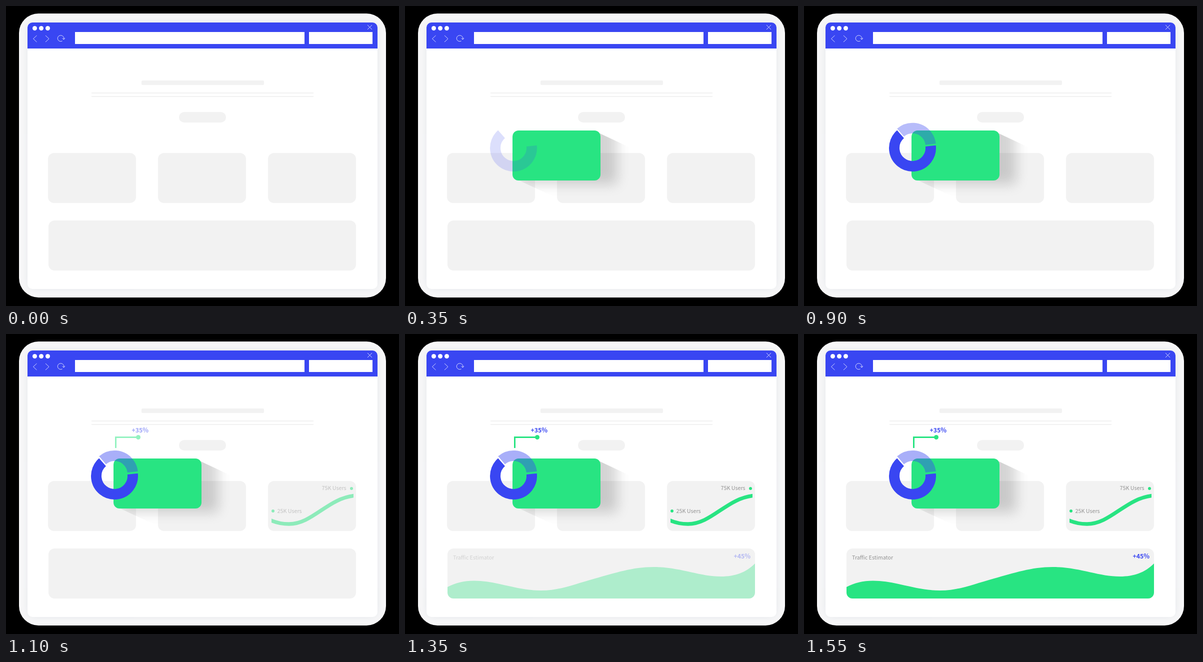
Write an HTML page that moves like this. It is 786 by 600 pixels and loops after 3.55 s.

```html
<!DOCTYPE html>
<html lang="en">
<head>
<meta charset="utf-8">
<title>Traffic dashboard</title>
<style>
  html, body { margin: 0; height: 100%; overflow: hidden; background: #000; }
  svg { display: block; }
  text { font: 10.75px "Noto Sans CJK SC", "Noto Sans CJK JP", "Noto Sans CJK", "Open Sans", sans-serif; fill: #929292; }
  .gain { font-size: 12.3px; font-weight: 700; fill: #3946f2; }
  .blocks { fill: #f2f2f2; }
  .icons { fill: none; stroke: #fff; stroke-width: .8; }
  .green { fill: #28e482; }
  .line { fill: none; stroke: #28e482; }
  .ring { fill: none; stroke: #3946f2; stroke-width: 21; }
  .layer { opacity: 0; }
</style>
</head>
<body>
<svg width="786" height="600" viewBox="0 0 786 600">
  <defs>
    <filter id="halo" x="-10%" y="-10%" width="120%" height="120%"><feGaussianBlur stdDeviation="9"/></filter>
    <filter id="soft" x="-40%" y="-50%" width="180%" height="200%"><feGaussianBlur stdDeviation="13"/></filter>
    <clipPath id="frame"><rect x="26" y="15" width="734" height="568" rx="39"/></clipPath>
    <clipPath id="window"><rect x="43" y="33" width="700" height="533" rx="10"/></clipPath>
    <clipPath id="sweep"><path d="M388 254L490 302V420H380L222 346Z"/></clipPath>
    <clipPath id="chart"><rect x="531" y="300" width="164" height="90"/></clipPath>
    <clipPath id="panel"><rect x="85" y="429" width="615" height="100" rx="12"/></clipPath>
  </defs>

  <g clip-path="url(#frame)">
    <rect width="786" height="600" fill="#f8f8f9"/>
    <rect x="43" y="33" width="700" height="533" rx="10" fill="#1c3050" opacity=".08" filter="url(#halo)"/>
  </g>
  <g clip-path="url(#window)">
    <rect x="43" y="33" width="700" height="533" fill="#fff"/>
    <rect x="43" y="33" width="700" height="52" fill="#3946f2"/>
  </g>
  <g fill="#fff">
    <circle cx="57.5" cy="44.5" r="4.5"/>
    <circle cx="70.5" cy="44.5" r="4.5"/>
    <circle cx="83.5" cy="44.5" r="4.5"/>
    <rect x="138" y="52" width="459" height="24"/>
    <rect x="606" y="52" width="127" height="24"/>
  </g>
  <path class="icons" d="M723 38l9 9m0-9l-9 9M61.5 59l-7 6.5l7 6.5M79 59l7 6.5l-7 6.5
    M112.5 70A6.3 6 0 1 1 115.5 66.5M112.5 64.5l3 2.5l2.5-3"/>

  <g class="blocks">
    <rect x="271" y="149" width="245" height="9" rx="2"/>
    <rect x="171" y="173" width="444" height="2"/>
    <rect x="171" y="180" width="444" height="2"/>
    <rect x="346" y="212" width="94" height="21" rx="10.5"/>
    <rect x="84" y="294" width="176" height="100" rx="12"/>
    <rect x="304" y="294" width="176" height="100" rx="12"/>
    <rect x="524" y="294" width="176" height="100" rx="12"/>
    <rect x="85" y="429" width="615" height="100" rx="12"/>
  </g>

  <g class="layer" id="card">
    <g clip-path="url(#sweep)">
      <rect x="232" y="225" width="192" height="131" opacity=".17" filter="url(#soft)"/>
    </g>
    <rect class="green" x="215" y="249" width="176" height="100" rx="12"/>
  </g>

  <g class="layer" id="major">
    <circle class="ring" r="36.5" pathLength="360" stroke-dasharray="235.5 360" transform="translate(217 284) rotate(-6.5)"/>
  </g>
  <g class="layer" id="minor">
    <circle class="ring" r="36.5" pathLength="360" stroke-dasharray="124.5 360" stroke-opacity=".43" transform="translate(217 284) rotate(229)"/>
  </g>

  <g class="layer" id="growth">
    <path class="line" stroke-width="3" d="M219.5 228V206.5H264"/>
    <circle class="green" cx="264.5" cy="206.5" r="4.5"/>
    <text class="gain" x="251.5" y="197">+35%</text>
    <path class="line" stroke-width="7.5" clip-path="url(#chart)" d="M526 371Q545 380 566 380C614 380 644 327 700 323"/>
    <circle class="green" cx="691" cy="309" r="3"/>
    <text x="631.5" y="312">75K Users</text>
    <circle class="green" cx="534" cy="354" r="3"/>
    <text x="542.5" y="358">25K Users</text>
  </g>

  <g class="layer" id="traffic">
    <path class="green" clip-path="url(#panel)" d="M85 506C100 498 118 493.5 138 493.5C185 493.5 222 513 272 513
      C310 513 340 500 380 489C420 478 455 466 497 466C550 466 588 485 632 485C660 485 682 477 700 459V529H85Z"/>
    <text x="96" y="451">Traffic Estimator</text>
    <text class="gain" x="657.5" y="449">+45%</text>
  </g>
</svg>
<script>
  const LOOP = 3550, TICK = 50, FADE = 6;
  // Tick after which each layer starts to fade in
  const starts = { card: 0, major: 6, minor: 13, growth: 19, traffic: 25 };
  const layer = id => document.getElementById(id);

  function draw(now) {
    const tick = Math.floor(now % LOOP / TICK);
    const progress = id => Math.min(1, Math.max(0, (tick - starts[id]) / FADE));
    for (const id in starts) layer(id).style.opacity = progress(id);
    layer("minor").setAttribute("transform", `translate(0 ${-4 * progress("minor")})`);
  }

  let begin;
  function loop(now) {
    begin ??= now;
    draw(now - begin);
    requestAnimationFrame(loop);
  }
  requestAnimationFrame(loop);
</script>
</body>
</html>
```
